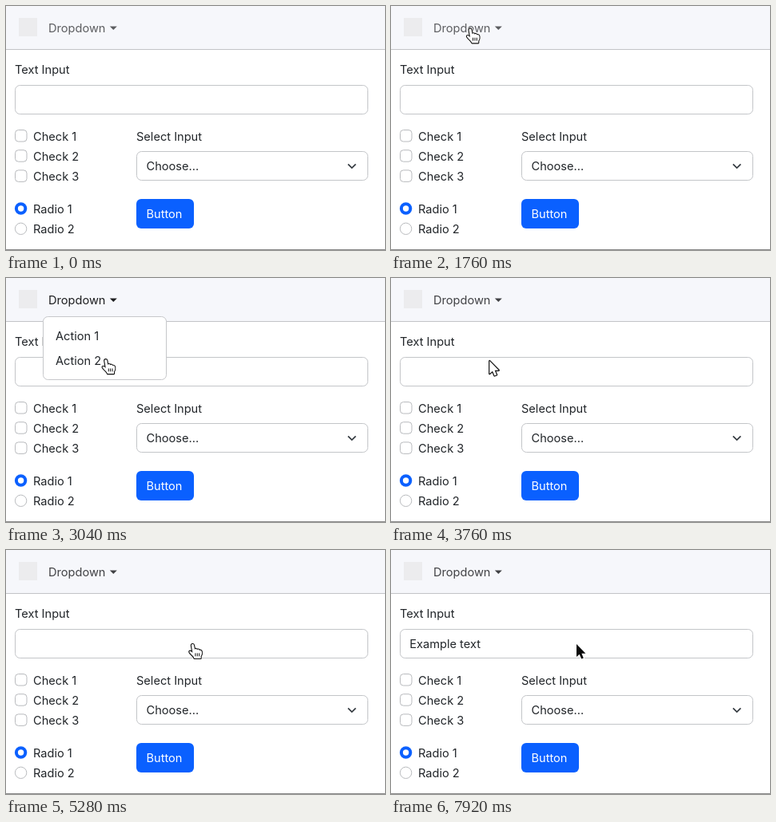
Write an HTML page with a canvas that moves like this. It is 474 px wide and 306 px high and loops after 8 s.

```html
<!DOCTYPE html>
<html lang="en">
<head>
<meta charset="utf-8">
<title>Form demo</title>
<style>
html, body { margin: 0; width: 100%; height: 100%; overflow: hidden; background: #fff; }
canvas { display: block; width: 474px; height: 306px; }
</style>
</head>
<body>
<canvas id="stage"></canvas>
<script>
const W = 474, H = 306, LOOP = 8000;
const INK = '#212529', LINE = '#c3c5c8', BLUE = '#0a60ff';
const canvas = document.getElementById('stage');
const ctx = canvas.getContext('2d');
const dpr = window.devicePixelRatio || 1;
canvas.width = W * dpr;
canvas.height = H * dpr;

const ARROW = new Path2D('M0 0V16L3.7 12.7L6.2 18.5L8.8 17.4L6.4 11.7H11.4Z');
const HAND = new Path2D(
  'M5.2 11.6L3.7 2.6C3.5 .3 6.3 0 6.8 2.2L7.8 7.4C8.2 6.2 10.4 6.3 10.8 7.8' +
  'C11.4 6.8 13.2 7 13.6 8.6C14.4 7.9 16.3 8.3 16.6 10.2C17 12.4 16.8 14 15.4 16V18.6H7.4' +
  'C6.8 16.2 3.4 14 1.4 11.2C.2 9 2.6 8.2 5.2 11.6Z');
const CREASES = new Path2D('M8.7 12V15.8M11.1 12V15.8M13.5 12V15.8');

// Cursor stops, with the start of each glide and of the press and rest that follow.
const HOME = [237, 153];
const STOPS = [
  { at: [96, 27.5], go: 480, press: 1840, rest: 2090 },
  { at: [123.3, 104], go: 2130, press: 3520, rest: 3920 },
  { at: [232, 118], go: 4050, press: 5440, rest: 5840 }
];
const GLIDE = 250;
const OPEN = 2000, CLOSE = 3680;
const TYPE_START = 6400, TYPE_STEP = 120, MESSAGE = 'Example text';

function text(s, x, y, color = INK) {
  ctx.fillStyle = color;
  ctx.fillText(s, x, y);
}

function box(x, y, w, h, r, fill, stroke) {
  ctx.beginPath();
  ctx.roundRect(x, y, w, h, r);
  ctx.fillStyle = fill;
  ctx.fill();
  if (stroke) {
    ctx.strokeStyle = stroke;
    ctx.lineWidth = 1;
    ctx.stroke();
  }
}

function dot(x, y, r, fill, stroke) {
  box(x - r, y - r, 2 * r, 2 * r, r, fill, stroke);
}

function navbar(t) {
  ctx.fillStyle = '#f6f7fb';
  ctx.fillRect(0, 0, W, 54);
  ctx.fillStyle = '#c2c3c7';
  ctx.fillRect(0, 54, W, 1);
  box(16, 15, 23, 23, 0, '#ececee');

  const color = t < 1840 ? '#5c5d60' : t >= OPEN && t < CLOSE ? '#1c1d1f' : '#404144';
  text('Dropdown', 53, 33, color);
  ctx.beginPath();
  ctx.moveTo(129.8, 25.4);
  ctx.lineTo(138.8, 25.4);
  ctx.lineTo(134.3, 30);
  ctx.fill();
}

function form(t) {
  text('Text Input', 11, 85);
  box(11.5, 99.5, 441, 36, 6, '#fff', LINE);
  const typed = Math.max(0, Math.floor((t - TYPE_START) / TYPE_STEP) + 1);
  text(MESSAGE.slice(0, typed), 23.3, 123);

  for (let i = 0; i < 3; i++) {
    const y = 155.5 + i * 25.2;
    box(11.5, y, 14.5, 14.5, 4, '#fff', '#b9bbbe');
    text('Check ' + (i + 1), 34, y + 13);
  }

  dot(18.6, 254, 7.7, BLUE);
  dot(18.6, 254, 3.7, '#fff');
  dot(18.6, 279.3, 7.2, '#fff', '#b9bbbe');
  text('Radio 1', 34, 259.6);
  text('Radio 2', 34, 284.8);

  text('Select Input', 163, 168.5);
  box(163.5, 182.5, 289, 36, 6, '#fff', LINE);
  text('Choose...', 175.5, 206.3);
  ctx.beginPath();
  ctx.moveTo(427.8, 198.3);
  ctx.lineTo(432.6, 203);
  ctx.lineTo(437.4, 198.3);
  ctx.strokeStyle = '#343a40';
  ctx.lineWidth = 1.7;
  ctx.stroke();

  box(163, 242, 72, 37, 6, BLUE);
  text('Button', 175.5, 266.2, '#fff');

  ctx.fillStyle = '#8c8c8c';
  ctx.fillRect(0, 305, W, 1);
}

function menu() {
  box(46.5, 48.5, 154, 79, 6, '#fff', '#c6c7ca');
  text('Action 1', 62, 78.3);
  text('Action 2', 62, 109.3);
}

function paint(shape, fill, stroke, width) {
  ctx.lineWidth = width;
  ctx.strokeStyle = stroke;
  ctx.fillStyle = fill;
  ctx.stroke(shape);
  ctx.fill(shape);
}

function cursor(t) {
  const i = STOPS.findLastIndex(s => t >= s.go);
  if (i < 0) return;
  const stop = STOPS[i];
  const from = i ? STOPS[i - 1].at : HOME;
  const left = t < stop.press ? Math.exp((stop.go - t) / GLIDE) : 0;
  const [x, y] = stop.at.map((v, k) => v + (from[k] - v) * left);

  ctx.save();
  ctx.lineJoin = 'round';
  if (t < stop.press) {
    ctx.translate(x - 3, y - 0.5);
    paint(HAND, '#fff', '#fff', 3.6);
    paint(HAND, '#fff', '#111', 2.2);
    ctx.lineWidth = 1;
    ctx.stroke(CREASES);
  } else {
    ctx.translate(x, y);
    if (t < stop.rest) paint(ARROW, '#fff', '#111', 2.4);
    else paint(ARROW, '#0a0a0a', '#fff', 2.4);
  }
  ctx.restore();
}

function draw(now) {
  const t = now % LOOP;
  ctx.setTransform(dpr, 0, 0, dpr, 0, 0);
  ctx.fillStyle = '#fff';
  ctx.fillRect(0, 0, W, H);
  ctx.font = '14.6px Inter, "Open Sans", sans-serif';
  navbar(t);
  form(t);
  if (t >= OPEN && t < CLOSE) menu();
  cursor(t);
}

const start = performance.now();
function tick() {
  draw(performance.now() - start);
  requestAnimationFrame(tick);
}
tick();
</script>
</body>
</html>
```
